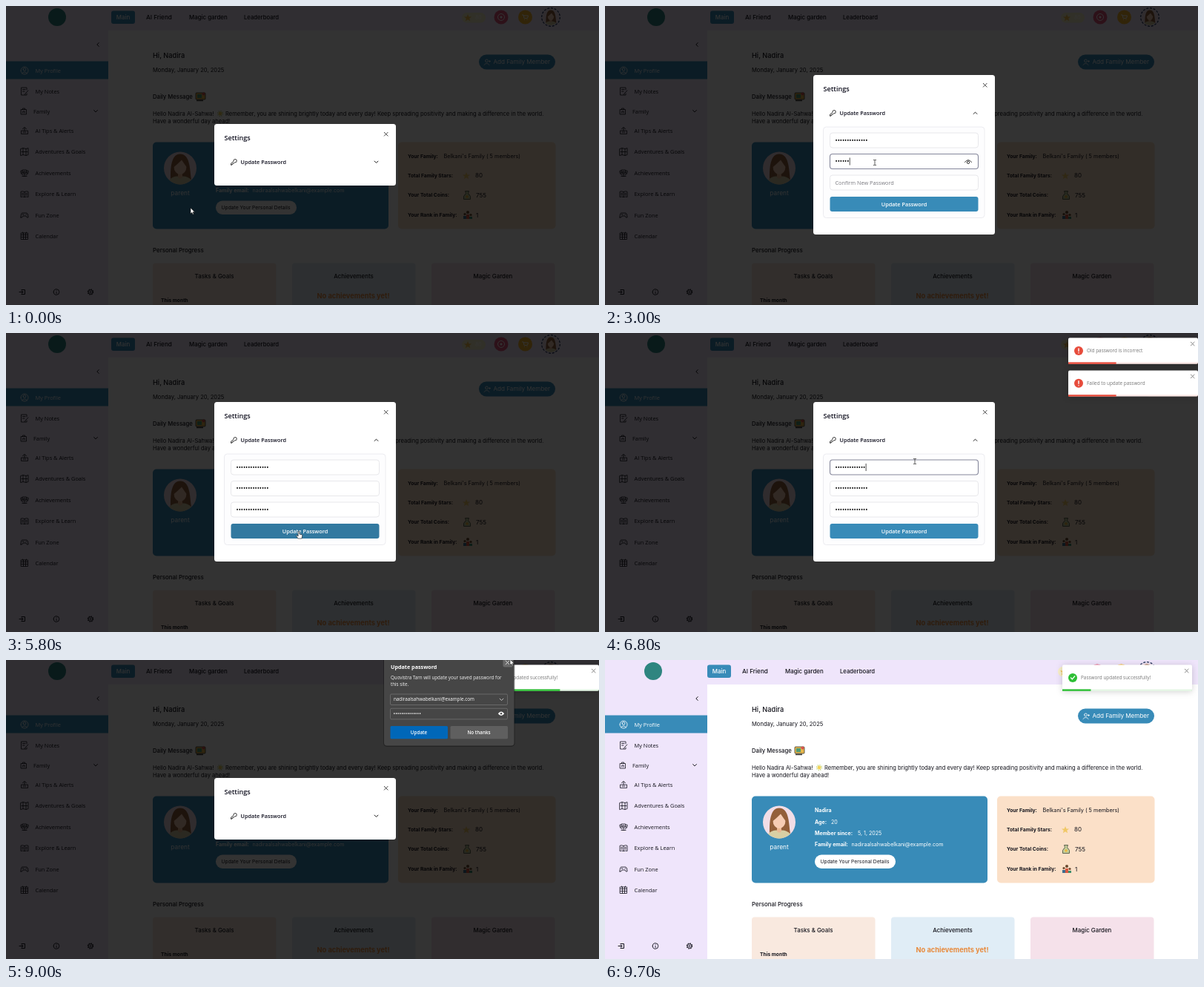
Write an HTML page that moves like this. It is 800 by 403 pixels and loops after 9.8 s.

```html
<!DOCTYPE html>
<html lang="en">
<head>
<meta charset="utf-8">
<title>Update password</title>
<style>
  html, body { margin: 0; width: 100%; height: 100%; overflow: hidden; background: #fff; }
  svg { display: block; }
  .body { font-family: Inter, sans-serif; }
  .ui { font-family: "Open Sans", sans-serif; }
  .toast { filter: drop-shadow(0 1px 4px rgba(0, 0, 0, .18)); }
</style>
</head>
<body>
<svg id="stage" width="800" height="403" viewBox="0 0 800 403">
  <g id="page"></g>
  <g id="live"></g>
</svg>
<script>
const LOOP = 9800, CLOSED_AT = 9450;
const BLUE = '#388bb8', LILAC = '#efe5fb', INK = '#14141c';
const EMAIL = 'nadiraalsahwabelkani@example.com';

// y is the visual middle of the line
const text = (font, x, y, size, str, color = INK, weight = 400, anchor = 'start') =>
  `<text class="${font}" x="${x}" y="${y + size * .35}" font-size="${size}" fill="${color}" font-weight="${weight}" text-anchor="${anchor}">${str}</text>`;
const heading = (x, y, str, { size = 7.9, color = INK, anchor } = {}) => text('body', x, y, size, str, color, 500, anchor);
const box = (x, y, w, h, fill, r = 0, extra = '') =>
  `<rect x="${x}" y="${y}" width="${w}" height="${h}" rx="${r}" fill="${fill}" ${extra}/>`;
const dot = (x, y, r, fill, extra = '') => `<circle cx="${x}" cy="${y}" r="${r}" fill="${fill}" ${extra}/>`;
const line = (x, y, d, color = INK, width = .8) =>
  `<path transform="translate(${x} ${y})" d="${d}" fill="none" stroke="${color}" stroke-width="${width}" stroke-linecap="round" stroke-linejoin="round"/>`;
const shape = (x, y, d, fill, extra = '') => `<path transform="translate(${x} ${y})" d="${d}" fill="${fill}" ${extra}/>`;

const CROSS = 'M-2.4-2.4L2.4 2.4M2.4-2.4L-2.4 2.4';
const DOWN = 'M-2.4-1.2L0 1.2L2.4-1.2';
const UP = 'M-2.4 1.2L0-1.2L2.4 1.2';
const EYE = 'M-4.5 .5Q0-5.5 4.5 .5M-1.7 .8a1.7 1.7 0 1 0 3.4 0a1.7 1.7 0 1 0-3.4 0';
const STAR = 'M0-5L1.4-1.6L5-1.5L2.2.8L3.1 4.3L0 2.3L-3.1 4.3L-2.2.8L-5-1.5L-1.4-1.6Z';
const PERSON = 'M-1.9-1.6a1.9 1.9 0 1 0 3.8 0a1.9 1.9 0 1 0-3.8 0M-3.6 4Q0-.4 3.6 4';

const avatar = (x, y, scale) => `<g transform="translate(${x} ${y}) scale(${scale})">` +
  dot(0, 0, 22, '#f1dde6') +
  shape(0, 0, 'M-13 16C-13 6-14-19 0-19S13 4 15 15Q0 22-13 16Z', '#935f3a') +
  shape(0, 0, 'M-15 16Q-10 11-4 11H4Q10 11 15 16Q0 28-15 16Z', '#d8cfa4') +
  box(-3, 4, 6, 10, '#eab894', 3) +
  `<ellipse cy="-2" rx="8.5" ry="10.5" fill="#f6ccb4"/>` +
  shape(0, 0, 'M-9-1Q-9-15 1-15Q9-14 9-1Q6-5 2-11Q-3-6-9-1Z', '#935f3a') + '</g>';

const sideItems = [
  ['My Profile', 87, 'M-5 0a5 5 0 1 0 10 0a5 5 0 1 0-10 0' + PERSON],
  ['My Notes', 115, 'M3-2V-5H-4.5V5H3V3M-2.5-2.5H1M-2.5 0H0M5-1L1 3L.5 4.5'],
  ['Family', 142, 'M-3.5-2.5H3.5V4H-3.5ZM-1.5-2.5V-4H1.5V-2.5M-1.2 2V0H1.2V2'],
  ['AI Tips &amp; Alerts', 168, 'M-4.5 4V0H4.5V4ZM0 0V-4M-2.5-2.5L0-4.5L2.5-2.5M-2 2H2'],
  ['Adventures &amp; Goals', 196.5, 'M-5-4L-2-5L2-4L5-5V4L2 5L-2 4L-5 5ZM-2-5V4M2-4V5M-4 0H4'],
  ['Achievements', 225, 'M-2.5-4H2.5V0Q0 3-2.5 0ZM0 2V4.5M-3 4.5H3M-3-3H-5Q-5.5 2-2 3M3-3H5Q5.5 2 2 3M-4-1L-3 1M4-1L3 1M-1-2H1V0H-1Z'],
  ['Explore &amp; Learn', 253.5, 'M0-3Q-3-4.5-5-3.2V4Q-3 3 0 4Q3 3 5 4V-3.2Q3-4.5 0-3V4M-3.5-1H-1.5M-3.5 1H-1.5M1.5-1H3.5M1.5 1H3.5'],
  ['Fun Zone', 282, 'M-5 3Q-5-3-3-3H3Q5-3 5 3Q3 4 2 1H-2Q-3 4-5 3ZM-3-1H-1M2-1H3'],
  ['Calendar', 310, 'M-4.5-4H4.5V4.5H-4.5ZM-4.5-1.5H4.5M-4.5 1.5H4.5M-1.5-4V4.5M1.5-4V4.5M-2.5-5V-4M2.5-5V-4'],
];

const sidebar = () => sideItems.map(([label, y, icon], i) => {
  const color = i ? INK : '#fff';
  return line(i === 2 ? 24 : 25, y, icon, color, .8) + text('ui', i === 2 ? 37 : 39.5, y, 7.4, label, color);
}).join('') + line(121, 141.7, DOWN, INK, 1) + line(124, 52, 'M1.2-2.4L-1.2 0L1.2 2.4', INK, 1) +
  line(22, 385.5, 'M-1-3H3.5V3H-1M-4 0H1M-.8-1.8L1 0L-.8 1.8', INK, 1) +
  line(68, 385.5, 'M-3.8 0a3.8 3.8 0 1 0 7.6 0a3.8 3.8 0 1 0-7.6 0M0 0V2M0-1.8V-1.7', INK, .9) +
  dot(114, 385.5, 3.6, 'none', `stroke="${INK}" stroke-width="1.2" stroke-dasharray="1.5 1.33"`) +
  dot(114, 385.5, 2.9, 'none', `stroke="${INK}" stroke-width=".9"`) + dot(114, 385.5, 1.1, 'none', `stroke="${INK}" stroke-width=".8"`);

const header = () => '<g id="header">' +
  dot(65, 15, 12, '#2f8580') +
  box(138, 6.5, 32, 17.5, BLUE, 3) +
  heading(154, 15, 'Main', { color: '#fff', anchor: 'middle' }) +
  heading(185, 15, 'AI Friend', { size: 8.2 }) +
  heading(243, 15, 'Magic garden') +
  heading(317, 15, 'Leaderboard', { size: 7.7 }) +
  box(611, 9, 32, 13.5, '#f8efc8', 6.5) + shape(619, 16, STAR, '#f5c04c') + text('body', 629, 16, 7, '80', '#fff') +
  dot(664, 15, 9.5, '#e2557c') + dot(664, 15, 4.5, 'none', 'stroke="#fff" stroke-width="1"') + dot(664, 15, 1.5, '#fff') +
  dot(696.5, 15, 9.5, '#f5b52c') + line(696.5, 15, 'M-4-3H-2.5L-1.5 1.5H3L4-2H-2M-1 3.5V3.6M2.5 3.5V3.6', '#fff', 1) +
  avatar(731, 15, .5) + dot(731, 15, 12.3, 'none', 'stroke="#1e2f55" stroke-width="1.2" stroke-dasharray="3 1.8"') + '</g>';

const detail = (y, label, x, value) =>
  text('body', 283, y, 7, label, '#fff', 700) + text('body', x, y, 7.1, value, '#fff');
const stat = (y, label) => text('body', 542, y, 6.75, label, INK, 700);

const content = () =>
  heading(198, 66.5, 'Hi, Nadira', { size: 9.2 }) +
  text('body', 198, 86, 7.6, 'Monday, January 20, 2025') +
  box(638, 65.5, 103, 20, BLUE, 10) + line(648.5, 75.5, PERSON + 'M3-1H5M4-2V0', '#fff') +
  text('body', 657.5, 75.5, 8.1, 'Add Family Member', '#fff') +
  heading(198, 122.5, 'Daily Message', { size: 7.7 }) +
  box(256, 117, 13, 9, '#e8b64c', 1, 'stroke="#3c3a32" stroke-width=".8"') + box(258, 119, 6, 5, '#4f9b74') +
  dot(266.5, 118.5, 2, '#d9534f') + box(257, 126.5, 9, 1.7, '#3c3a32') +
  text('body', 198, 145.3, 7.55, 'Hello Nadira Al-Sahwa!') +
  dot(289, 145, 2.4, '#f3d35a') + dot(289, 145, 3.4, 'none', 'stroke="#b5cf62" stroke-width="1.3" stroke-dasharray="1.2 1.47"') +
  text('body', 296, 145.3, 7.55, 'Remember, you are shining brightly today and every day! Keep spreading positivity and making a difference in the world.') +
  text('body', 198, 155.8, 7.55, 'Have a wonderful day ahead!') +
  box(198, 183.5, 318, 117, BLUE, 5) + avatar(235, 218.5, 1) +
  text('body', 235, 252, 8.3, 'parent', '#fff', 400, 'middle') +
  detail(203, 'Nadira', 0, '') + detail(218.5, 'Age:', 305, '20') +
  detail(234, 'Member since:', 341, '5, 1, 2025') + detail(249, 'Family email:', 332.5, EMAIL) +
  box(283, 262.5, 109, 18.5, '#fff', 9) + text('body', 290.5, 271.7, 6.75, 'Update Your Personal Details') +
  box(529, 183.5, 212.5, 117, '#fbe0c8', 5) +
  stat(202.5, 'Your Family:') + text('body', 590.5, 202.5, 7.3, "Belkani's Family ( 5 members)") +
  stat(228.5, 'Total Family Stars:') + shape(621, 229, STAR, '#f0c866') + text('body', 633, 228.5, 8, '80') +
  stat(255, 'Your Total Coins:') +
  shape(622, 255.5, 'M-1.5-3L-2.5-6H2.5L1.5-3Q6 1 4.5 5H-4.5Q-6 1-1.5-3Z', '#c5cf9a', 'stroke="#40483a" stroke-width=".8"') +
  dot(622, 257, 1.8, '#eab63e') + text('body', 634, 255, 8, '755') +
  stat(282, 'Your Rank in Family:') +
  box(617, 283, 4, 4, '#3d6d8f') + box(621, 281, 4, 6, '#d8573f') + box(625, 284, 4, 3, '#3d8f6c') +
  dot(623, 278, 2, '#6b4a2f') + dot(619, 280.5, 1.6, '#6b4a2f') + dot(627, 281.5, 1.6, '#6b4a2f') +
  text('body', 634, 282, 8, '1') +
  heading(198, 329, 'Personal Progress') +
  [[198, '#f9e9df', 'Tasks &amp; Goals'], [386, '#e0edf6', 'Achievements'], [574, '#f5e1ea', 'Magic Garden']].map(([x, fill, label]) =>
    box(x, 346.5, 166.5, 70, fill, 4) + heading(x + 83, 364, label, { anchor: 'middle' })).join('') +
  text('body', 209, 397, 6.7, 'This month', INK, 700) +
  text('body', 468.5, 391, 9.25, 'No achievements yet!', '#e8893a', 700, 'middle');

document.getElementById('page').innerHTML =
  box(0, 0, 800, 403, '#fff') + box(0, 0, 800, 33, LILAC) + box(0, 0, 138, 403, LILAC) + box(0, 74.5, 138, 24, BLUE) +
  header() + sidebar() + content();

const clamp = (v, lo, hi) => Math.min(hi, Math.max(lo, v));
const between = (t, a, b) => t >= a && t < b;

// keys are [position, ...values], eased from one to the next
function track(keys, t) {
  const i = keys.findIndex(k => k[0] > t);
  if (i < 1) return (i ? keys.at(-1) : keys[0]).slice(1);
  const a = keys[i - 1], b = keys[i], u = (t - a[0]) / (b[0] - a[0]), e = u * u * (3 - 2 * u);
  return b.slice(1).map((v, j) => a[j + 1] + (v - a[j + 1]) * e);
}

const EXPAND = [[480, 0], [560, 1], [8570, 1], [8640, 0]];
const MOUSE = [[100, 249, 272], [400, 420, 212], [560, 420, 212], [900, 366, 184], [2100, 366, 184], [2450, 364, 211],
  [3600, 364, 211], [3850, 362, 237], [5200, 362, 237], [5450, 395, 267], [5950, 395, 267], [6350, 418, 173],
  [7250, 418, 173], [7700, 378, 267], [8600, 378, 267], [8920, 680, -1], [9200, 680, -1], [9350, 684, -16]];
const FOCUS = [[950, 0], [2500, 1], [3900, 2], [5500, -1], [6400, 0], [7900, -1]];
const BOUNCE = [[0, 185], [.6, -12], [.75, 5], [.9, -2.5], [1, 0]];
const LEAVE = [[0, 0], [.2, -10], [1, 190]];

const typed = (t, start, step) => clamp(Math.floor((t - start) / step), 0, 14);

function field(i, count, t, focused) {
  const y = 78 + 28.5 * i, hint = ['Old Password', 'New Password', 'Confirm New Password'][i];
  const frame = focused ? 'stroke="#85879b" stroke-width="1.1"' : 'stroke="#e2e2e6" stroke-width=".8"';
  return box(22.5, y, 200, 20, '#fff', 3.5, frame) +
    (count ? text('ui', 29.5, y + 10, 8.33, '•'.repeat(count), '#111') : text('ui', 29.5, y + 10.2, 7.3, hint, '#78787f')) +
    (focused ? box(30 + 3.13 * count, y + 5, .8, 10, '#222') : '') +
    (focused && count && t < 6000 ? line(209, y + 10.5, EYE, '#333', 1) : '');
}

function modal(t, open, mouse) {
  const height = 83 + 132 * open, top = 200.5 - height / 2;
  const focus = (FOCUS.findLast(f => f[0] <= t) || [0, -1])[1];
  const counts = [between(t, 6600, 7100) ? 13 : typed(t, 1000, 60), typed(t, 2600, 60), typed(t, 4120, 75)];
  const hover = pointerKind(mouse, open) === 'hand';
  return `<svg x="281" y="${top}" width="245" height="${height}">` + box(0, 0, 245, height, '#fff', 3.5) +
    text('ui', 13.5, 18.5, 9.1, 'Settings', '#10101f', 600) + line(231.7, 13.7, CROSS, '#333', .9) +
    line(26.5, 51.3, 'M-.6-1.2a2.2 2.2 0 1 1 1.8 1.8L-.5 1.8H-1.6V3H-2.8V4H-4V2.3Z', '#222', .9) +
    text('ui', 35.5, 51.5, 7.3, 'Update Password', '#10101f', 600) +
    line(218.5, 51.3, open > .5 ? UP : DOWN, '#222', 1) +
    (open ? box(13.5, 70, 217.5, 122.5, '#fdfdfe', 4, 'stroke="#e8e8ec" stroke-width=".8"') +
      counts.map((n, i) => field(i, n, t, i === focus)).join('') +
      box(22.5, 164, 200, 20, hover ? '#3279a0' : BLUE, 3) +
      text('ui', 122.5, 174, 7.3, 'Update Password', '#fff', 600, 'middle') : '') + '</svg>';
}

function toast(t, start, y, message, color, good, shift) {
  const life = 1460, age = t - start;
  if (age < 0 || age > life + 220) return '';
  const slide = age > life ? track(LEAVE, (age - life) / 220)[0] : track(BOUNCE, age / 220)[0];
  const mark = good ? 'M-2.5 0L-.7 2L2.7-2' : 'M0-3V.6M0 2.9V3';
  return `<g class="toast" transform="translate(${625 + slide - shift} ${y})">` + box(0, 0, 175, 35.2, '#fff', 2) +
    dot(14, 17.3, 6, color) + line(14, 17.3, mark, '#fff', 1.4) +
    text('ui', 25, 17.5, 6.4, message, '#757575') + line(167.7, 8, CROSS, '#888', 1) +
    box(0, 32.8, 175, 2.4, color, 0, 'opacity=".12"') +
    box(0, 32.8, 175 * clamp(1 - age / life, 0, 1), 2.4, color) + '</g>';
}

const popup = () =>
  box(509, -10, 177.5, 127, '#000', 5, 'opacity=".3"') + box(510, -10, 175.5, 125.5, '#464646', 4) +
  box(670.5, -3, 13.5, 12.5, '#6a6a6a', 2) + line(676.5, 3.5, CROSS, '#eee', .8) +
  text('ui', 519, 9, 7.2, 'Update password', '#fff', 700) +
  text('ui', 519, 23.5, 6.25, 'Quovistra Tarn will update your saved password for', '#f2f2f2') +
  text('ui', 519, 32.5, 6.25, 'this site.', '#f2f2f2') +
  [46, 65.3].map(y => box(518.5, y, 158, 14.5, '#464646', 1.5, 'stroke="#777" stroke-width=".7"')).join('') +
  text('ui', 523, 53.2, 6.3, EMAIL, '#fff') + line(668.5, 53.3, DOWN, '#ddd', .8) +
  text('ui', 522.5, 72.5, 7.1, '•'.repeat(14), '#fff') +
  shape(668, 72.3, 'M-4.2 0Q0-5.4 4.2 0Q0 5.4-4.2 0Z', '#fff') + dot(668, 72.3, 1.2, '#464646') +
  box(518.5, 89, 77.5, 17.3, '#0067b8', 1.5) + text('ui', 557, 97.7, 6.3, 'Update', '#fff', 600, 'middle') +
  box(599.5, 89, 77.5, 17.3, '#5f5f5f', 1.5) + text('ui', 638, 97.7, 6.3, 'No thanks', '#fff', 600, 'middle');

function pointerKind([x, y], open) {
  if (open < .5) return between(x, 295, 512) && between(y, 202, 220) ? 'hand' : 'arrow';
  if (!between(x, 303, 504)) return 'arrow';
  if (between(y, 257, 277) || between(y, 136, 153)) return 'hand';
  return [171, 199.5, 228].some(top => between(y, top, top + 20)) ? 'beam' : 'arrow';
}

function pointer(mouse, open) {
  const [x, y] = mouse, kind = pointerKind(mouse, open), edge = 'stroke="#111" stroke-width=".6" stroke-linejoin="round"';
  if (kind === 'beam') return line(x, y, 'M-1.6-3.5H-.5L0-3L.5-3.5H1.6M0-3V3M-1.6 3.5H-.5L0 3L.5 3.5H1.6', '#333', .8);
  if (kind === 'hand') return shape(x, y, 'M-.9.5Q0-.5.9.5V4L4 4.7Q5 5 4.6 7L4 10H-1L-3.4 6.6Q-3.2 5.4-2 6L-.9 7Z', '#fff', edge);
  return shape(x, y, 'M0 0V8L1.8 6.3L3 9L4.3 8.4L3.1 5.8H5.6Z', '#fff', edge);
}

const live = document.getElementById('live'), headerGroup = document.getElementById('header');

function draw(t) {
  const [open] = track(EXPAND, t), mouse = track(MOUSE, t), shown = t < CLOSED_AT;
  headerGroup.setAttribute('transform', `translate(${shown ? 4 : 0} 0)`);
  live.innerHTML =
    (shown ? box(0, 0, 800, 403, '#000', 0, 'opacity=".8"') + modal(t, open, mouse) : '') +
    toast(t, 5880, 6.6, 'Old password is incorrect', '#e74c3c', false, 0) +
    toast(t, 5880, 50.4, 'Failed to update password', '#e74c3c', false, 0) +
    toast(t, 8562, 6.6, 'Password updated successfully!', '#2dbf35', true, shown ? 0 : 8) +
    (between(t, 8700, 9250) ? popup() : '') + pointer(mouse, open);
}

const start = performance.now();
(function tick() {
  draw((performance.now() - start) % LOOP);
  requestAnimationFrame(tick);
})();
</script>
</body>
</html>
```
